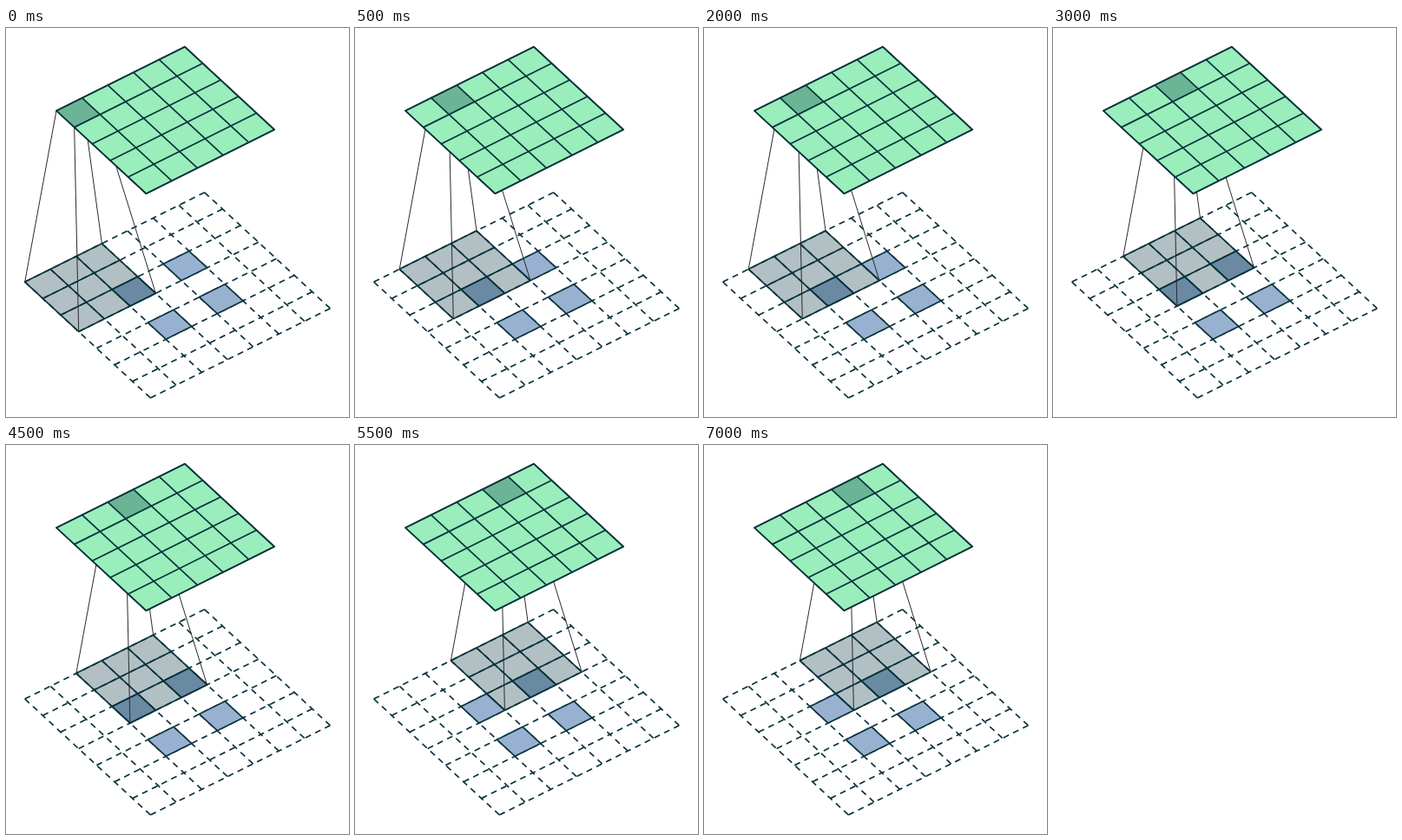
An HTML page for the animation above (8 s loop, 395 px wide and 449 px high).

```html
<!DOCTYPE html>
<html>
<head>
<meta charset="utf-8">
<title>Dilated convolution</title>
<style>
  html, body { margin: 0; width: 100%; height: 100%; overflow: hidden; background: #fff; }
  svg { display: block; }
  path { fill: none; stroke: #0a333d; stroke-width: 1.7; stroke-linejoin: round; stroke-linecap: round; }
  .dash-u, .dash-v { stroke-linecap: butt; }
  .dash-u { stroke-dasharray: 7 5.47; }
  .dash-v { stroke-dasharray: 7 5.67; }
  .blue { fill: #98b1d0; }
  .green { fill: #99eebb; }
  .shade { fill: rgba(2, 48, 60, .3); stroke: none; }
  .ray { stroke: #2a2a2a; stroke-width: 1; }
</style>
</head>
<body>
<svg width="395" height="449" viewBox="0 0 395 449"></svg>
<script>
const svg = document.querySelector('svg');

// Projects grid coordinates (u, v) of a plane onto the stage.
const plane = (x, y) => (u, v) =>
  `${(x + u * 29.57 + v * 20.66).toFixed(2)} ${(y - u * 14.76 + v * 19.13).toFixed(2)}`;
const input = plane(21.7, 293.1);
const output = plane(58, 95.5);

function add(className) {
  const path = document.createElementNS('http://www.w3.org/2000/svg', 'path');
  path.setAttribute('class', className);
  svg.append(path);
  return path;
}

const line = (a, b) => `M${a}L${b}`;
const square = (at, u, v, n) =>
  `M${at(u, v)}L${at(u + n, v)}L${at(u + n, v + n)}L${at(u, v + n)}Z`;

function rows(at, u, v, n, from = 0, to = n) {
  let d = '';
  for (let i = from; i <= to; i++) d += line(at(u, v + i), at(u + n, v + i));
  return d;
}

function columns(at, u, v, n, from = 0, to = n) {
  let d = '';
  for (let i = from; i <= to; i++) d += line(at(u + i, v), at(u + i, v + n));
  return d;
}

const grid = (at, u, v, n) =>
  square(at, u, v, n) + rows(at, u, v, n, 1, n - 1) + columns(at, u, v, n, 1, n - 1);

const draw = (path, d) => path.setAttribute('d', d);

draw(add('dash-u'), rows(input, 0, 0, 7));
draw(add('dash-v'), columns(input, 0, 0, 7));
for (const v of [2, 4])
  for (const u of [2, 4]) draw(add('blue'), square(input, u, v, 1));
const kernelShade = add('shade');
const kernelGrid = add('');
const rays = add('ray');
draw(add('green'), square(output, 0, 0, 5));
const cellShade = add('shade');
draw(add(''), grid(output, 0, 0, 5));

function place(step) {
  draw(kernelShade, square(input, step, 0, 3));
  draw(kernelGrid, grid(input, step, 0, 3));
  draw(cellShade, square(output, step, 0, 1));
  draw(rays, [[0, 0], [1, 0], [1, 1], [0, 1]].map(([u, v]) =>
    line(output(step + u, v), input(step + 3 * u, 3 * v))).join(''));
}

let shown = -1;
function tick() {
  const t = performance.now() % 8000;
  const step = t < 500 ? 0 : 1 + Math.floor((t - 500) / 2500);
  if (step !== shown) place(shown = step);
  requestAnimationFrame(tick);
}
tick();
</script>
</body>
</html>
```
